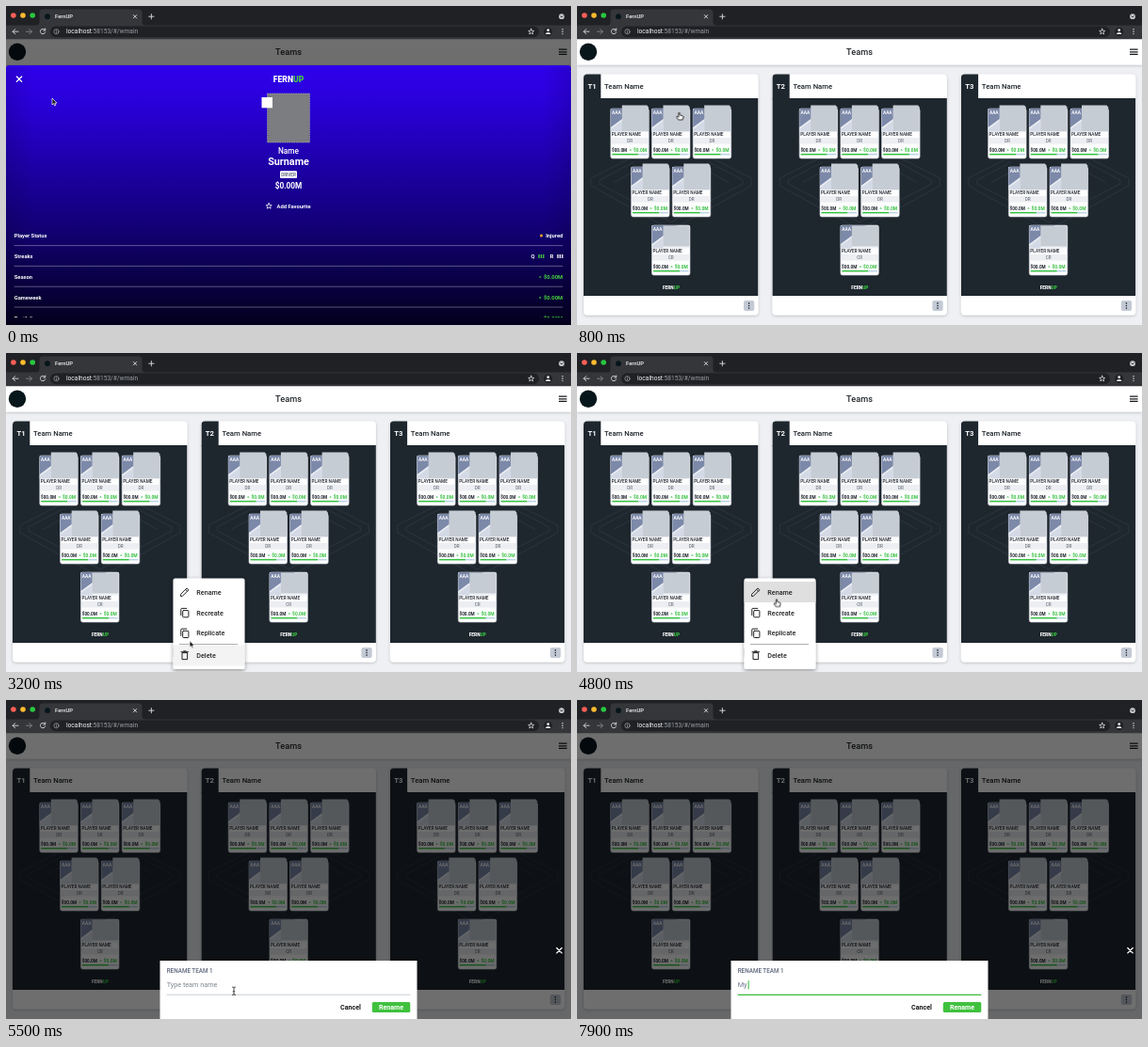
An HTML page that plays this animation: 600x339 px, repeating every 8000 ms.

```html
<!DOCTYPE html>
<html lang="en">
<head>
<meta charset="utf-8">
<title>Teams</title>
<style>
html, body { margin: 0; width: 100%; height: 100%; overflow: hidden; background: #eef0f3; }
svg { display: block; width: 100%; height: 100%; }
text { font-family: Roboto, "Liberation Sans", sans-serif; }
.m { font-weight: 500; }
.b { font-weight: 700; }
.k { font-weight: 900; }
.c { text-anchor: middle; }
.e { text-anchor: end; }
.line { fill: none; stroke-linecap: round; stroke-linejoin: round; }

#sheet, #dim, #menu, #menu-box, .hover, #dialog, #dialog-x, .pointer, #pointer,
#focus, #hint, #m, #y, #caret, #caret-x {
  animation: 8s linear infinite;
}
#sheet { animation-name: sheet; }
#dim { animation-name: dim; }
#menu { animation-name: menu; }
#menu-box { animation-name: grow; }
#h-delete { animation-name: h-delete; }
#h-replicate { animation-name: h-replicate; }
#h-recreate { animation-name: h-recreate; }
#h-rename { animation-name: h-rename; }
#dialog { animation-name: dialog; }
#dialog-x { animation-name: dialog-x; }
#focus { animation-name: focus; }
#hint { animation-name: hint; animation-timing-function: step-end; }
#m { animation-name: key-m; animation-timing-function: step-end; }
#y { animation-name: key-y; animation-timing-function: step-end; }
#caret-x { animation-name: caret-x; animation-timing-function: step-end; }
#caret { animation-name: caret; }
#pointer { animation-name: travel; animation-timing-function: ease-in-out; }
.pointer { animation-timing-function: step-end; }
#arrow { animation-name: arrow; }
#hand { animation-name: hand; }
#beam { animation-name: beam; }

@keyframes sheet {
  0%, 6.4% { transform: translateY(0); }
  7.45%, 7.8% { transform: translateY(10.8px); }
  8.75% { transform: translateY(125px); }
  9.85%, 100% { transform: translateY(285px); }
}
@keyframes dim {
  0%, 6.4% { opacity: 1; }
  7.5% { opacity: .96; }
  8.75% { opacity: .5; }
  9.85%, 62.5% { opacity: 0; }
  65.6%, 100% { opacity: 1; }
}
@keyframes menu {
  0%, 31.3% { opacity: 0; }
  33.5%, 60.8% { opacity: 1; }
  62.6%, 100% { opacity: 0; }
}
@keyframes grow {
  0%, 31.3% { clip-path: inset(0 60% 90% 0); }
  35%, 100% { clip-path: inset(-5px -5px -5px -5px); }
}
@keyframes h-delete {
  0%, 33% { opacity: 0; }
  34%, 39.6% { opacity: .5; }
  41%, 100% { opacity: 0; }
}
@keyframes h-replicate {
  0%, 40.2% { opacity: 0; }
  40.8%, 41.3% { opacity: .4; }
  42%, 100% { opacity: 0; }
}
@keyframes h-recreate {
  0%, 41.3% { opacity: 0; }
  41.8%, 42.3% { opacity: .4; }
  43.2%, 100% { opacity: 0; }
}
@keyframes h-rename {
  0%, 42.3% { opacity: 0; }
  43%, 58.7% { opacity: .5; }
  60%, 100% { opacity: 1; }
}
@keyframes dialog {
  0%, 62.5% { transform: translateY(64px); animation-timing-function: ease-out; }
  66%, 100% { transform: translateY(0); }
}
@keyframes dialog-x {
  0%, 62.5% { opacity: 0; }
  66%, 100% { opacity: 1; }
}
@keyframes focus {
  0%, 73.2% { opacity: 0; }
  76.2%, 100% { opacity: 1; }
}
@keyframes hint { 0% { opacity: 1; } 83.7%, 100% { opacity: 0; } }
@keyframes key-m { 0% { opacity: 0; } 83.7%, 100% { opacity: 1; } }
@keyframes key-y { 0% { opacity: 0; } 87.5%, 100% { opacity: 1; } }
@keyframes caret-x {
  0% { transform: translateX(-10.6px); }
  83.7% { transform: translateX(-3.6px); }
  87.5%, 100% { transform: translateX(0); }
}
@keyframes caret {
  0%, 73.2% { opacity: 0; }
  74.5%, 94.2% { opacity: 1; }
  96%, 97.6% { opacity: 0; }
  98.7%, 100% { opacity: 1; }
}
@keyframes travel {
  0% { transform: translate(49px, 98px); }
  5%, 7.6% { transform: translate(13.5px, 77px); }
  9.9%, 10.2% { transform: translate(108.5px, 113px); animation-timing-function: linear; }
  11.25% { transform: translate(138px, 186px); animation-timing-function: ease-out; }
  15%, 19% { transform: translate(168px, 284px); }
  26%, 34% { transform: translate(182px, 317px); }
  40% { transform: translate(195px, 306px); animation-timing-function: ease-out; }
  43.75% { transform: translate(212px, 263px); }
  45%, 61.5% { transform: translate(212px, 261.5px); }
  68.5%, 100% { transform: translate(242px, 309px); }
}
@keyframes arrow {
  0% { opacity: 1; }
  4.9% { opacity: 0; }
  7.4% { opacity: 1; }
  8.9% { opacity: 0; }
  12% { opacity: 1; }
  24.5% { opacity: 0; }
  39% { opacity: 1; }
  40.5% { opacity: 0; }
  62.5% { opacity: 1; }
  66%, 100% { opacity: 0; }
}
@keyframes hand {
  0% { opacity: 0; }
  4.9% { opacity: 1; }
  7.4% { opacity: 0; }
  8.9% { opacity: 1; }
  12% { opacity: 0; }
  24.5% { opacity: 1; }
  39% { opacity: 0; }
  40.5% { opacity: 1; }
  62.5%, 100% { opacity: 0; }
}
@keyframes beam {
  0% { opacity: 0; }
  66% { opacity: 1; }
  71.2%, 100% { opacity: 0; }
}
</style>
</head>
<body>
<svg viewBox="0 0 600 339" preserveAspectRatio="none">
  <defs>
    <linearGradient id="blue" x1="0" y1="0" x2="0" y2="1">
      <stop offset="0" stop-color="#2f00ec"/>
      <stop offset=".15" stop-color="#2900d8"/>
      <stop offset=".6" stop-color="#13007a"/>
      <stop offset="1" stop-color="#03001c"/>
    </linearGradient>
    <linearGradient id="sides">
      <stop offset="0" stop-opacity=".12"/>
      <stop offset=".05" stop-opacity="0"/>
      <stop offset=".95" stop-opacity="0"/>
      <stop offset="1" stop-opacity=".12"/>
    </linearGradient>
    <filter id="soft" x="-10%" y="-10%" width="120%" height="125%">
      <feDropShadow dx="0" dy="1" stdDeviation="1.5" flood-opacity=".22"/>
    </filter>
    <filter id="deep" x="-15%" y="-15%" width="130%" height="130%">
      <feDropShadow dx="0" dy="1.5" stdDeviation="2" flood-opacity=".4"/>
    </filter>
    <clipPath id="view"><rect y="63" width="600" height="268"/></clipPath>
    <clipPath id="page"><rect y="35" width="600" height="304"/></clipPath>
    <clipPath id="team-clip"><rect x="7" y="72.5" width="185.5" height="256" rx="4"/></clipPath>

    <path id="star" class="line" d="M0-3 .9-.9 3-.8 1.4 .6 1.9 2.7 0 1.5-1.9 2.7-1.4 .6-3-.8-.9-.9z"/>
    <path id="cross" class="line" d="M-2.7-2.7 2.7 2.7M2.7-2.7-2.7 2.7"/>
    <g id="copy" class="line" stroke="#222">
      <rect x="-2.3" y="-2.2" width="6.2" height="7.2" rx=".7"/>
      <path d="M-4.2 2.8V-3.6Q-4.2-4.4-3.4-4.4H1.8"/>
    </g>
    <path id="bars" d="M0-2v4M2.4-2v4M4.8-2v4" stroke-width="1.3"/>

    <g id="player">
      <rect width="40.5" height="53" rx="2" fill="#fdfdfe" stroke="#d3d8e0" stroke-width=".6"/>
      <path d="M0 24.5V0H40V24.5z" fill="#eceff4"/>
      <path d="M0 2Q0 0 2 0H27L0 20z" fill="#7c89a9"/>
      <path d="M0 24.5V22L12 13V24.5z" fill="#d4dae5"/>
      <text class="b" x="1.3" y="6.2" font-size="4.8" fill="#fff">AAA</text>
      <text class="m" x="1" y="29" font-size="4.7" fill="#20262e">PLAYER NAME</text>
      <rect x=".5" y="31" width="39.5" height="6.5" fill="#eceef2"/>
      <text class="b" x="1.2" y="45.6" font-size="4.7" fill="#1c2229">$00.0M</text>
      <g fill="#35c13f">
        <path d="M19.7 44.6 21 43.1 22.3 44.6z"/>
        <text class="b" x="24.2" y="45.6" font-size="4.9">$0.0M</text>
        <rect x="1.5" y="47.9" width="28" height="1.5"/>
      </g>
      <rect x="29.5" y="47.9" width="9.5" height="1.5" fill="#b9d3e6"/>
    </g>
    <g id="driver">
      <use href="#player"/>
      <path d="M12-3.6H38.5L40.2-1.5V24.3H12z" fill="#c6ccd4"/>
      <text class="c" x="20.3" y="36" font-size="4.6" fill="#565d68">DR</text>
    </g>
    <g id="crew">
      <use href="#player"/>
      <rect x="12" y=".4" width="28" height="22" fill="#c6ccd4"/>
      <text class="c" x="20.3" y="36" font-size="4.6" fill="#565d68">CR</text>
    </g>

    <g id="team">
      <rect x="7" y="72.5" width="185.5" height="256" rx="4" fill="#fff" filter="url(#soft)"/>
      <g clip-path="url(#team-clip)" fill="#1e262e">
        <rect x="7" y="72" width="18.3" height="27"/>
        <rect x="7" y="98" width="185.5" height="210"/>
      </g>
      <path class="line" stroke="#29323b" stroke-width="1.2" d="M60 160 15 183V191L60 216L100 238 140 216 185 191V183L140 160M60 166 24 185V189L62 209 100 230 138 209 176 189V185L140 166M40 187 75 168M160 187 125 168"/>
      <text class="m" x="29" y="88.2" font-size="7.7" fill="#1d2228">Team Name</text>
      <use href="#driver" x="35.8" y="109"/>
      <use href="#driver" x="79.5" y="109"/>
      <use href="#driver" x="123.2" y="109"/>
      <use href="#driver" x="57.6" y="171"/>
      <use href="#driver" x="101.3" y="171"/>
      <use href="#crew" x="79.5" y="233"/>
      <text class="k c" x="100" y="301.3" font-size="4.8" fill="#fff">FERN<tspan fill="#35c13f">UP</tspan></text>
      <rect x="177" y="313" width="11.3" height="11" rx="2" fill="#c3cad5"/>
      <g fill="#20262e"><circle cx="182.6" cy="315.9" r=".8"/><circle cx="182.6" cy="318.5" r=".8"/><circle cx="182.6" cy="321.1" r=".8"/></g>
    </g>
  </defs>

  <!-- page -->
  <rect y="35" width="600" height="304" fill="#eef0f3"/>
  <rect y="35" width="600" height="27.5" fill="#fff" filter="url(#soft)"/>
  <circle cx="12" cy="48.7" r="9.2" fill="#06161b"/>
  <text class="m c" x="300" y="52.3" font-size="9.2" fill="#23272c">Teams</text>
  <path d="M587 46.2h8.6M587 48.8h8.6M587 51.4h8.6" stroke="#16191c" stroke-width="1.2"/>
  <use href="#team"/>
  <use href="#team" x="200.4"/>
  <use href="#team" x="400.8"/>
  <g class="b c" font-size="7.7" fill="#fff">
    <text x="16" y="88.2">T1</text>
    <text x="216.4" y="88.2">T2</text>
    <text x="416.8" y="88.2">T3</text>
  </g>

  <!-- popup menu -->
  <g id="menu"><g id="menu-box">
    <rect x="177.5" y="239.5" width="76" height="96.5" rx="2" fill="#fff" filter="url(#deep)"/>
    <g fill="#dfdfdf">
      <rect class="hover" id="h-rename" x="177.5" y="243" width="76" height="22"/>
      <rect class="hover" id="h-recreate" x="177.5" y="265" width="76" height="22"/>
      <rect class="hover" id="h-replicate" x="177.5" y="287" width="76" height="22"/>
      <rect class="hover" id="h-delete" x="177.5" y="310.5" width="76" height="22"/>
    </g>
    <path d="M184 309.5H246" stroke="#a6a6a6" stroke-width=".9"/>
    <g class="line" stroke="#222">
      <path d="M185.6 258.2V256.3L192 249.9 193.9 251.8 187.5 258.2zM190.6 251.3 192.5 253.2"/>
      <path d="M187 319V325.6H192.6V319zM186 317.7H193.6M188.6 316.8H191"/>
    </g>
    <use href="#copy" x="190" y="275.8"/>
    <use href="#copy" x="190" y="297.5"/>
    <g class="m" font-size="7.2" fill="#262626">
      <text x="202.3" y="256.6">Rename</text>
      <text x="202.3" y="278.6">Recreate</text>
      <text x="202.3" y="300.2">Replicate</text>
      <text x="202.3" y="324.2">Delete</text>
    </g>
  </g></g>

  <rect id="dim" y="35" width="600" height="304" fill="#000" fill-opacity=".57"/>

  <!-- player sheet -->
  <g clip-path="url(#page)"><g id="sheet">
    <path id="panel" d="M0 340V67Q0 63 4 63H596Q600 63 600 67V340z" fill="url(#blue)"/>
    <use href="#panel"/>
    <rect y="65" width="600" height="275" fill="url(#sides)"/>
    <g clip-path="url(#view)" fill="#fff">
      <use href="#cross" x="14" y="77.7" stroke="#fff" stroke-width="1.3"/>
      <text class="k c" x="300" y="80.9" font-size="8.6">FERN<tspan fill="#45d13f">UP</tspan></text>
      <rect x="277.5" y="93" width="45" height="52" fill="#7b7d80" stroke="#a5a6aa" stroke-width=".7" stroke-dasharray="1.5 1"/>
      <rect x="271.5" y="97" width="11.5" height="11.3"/>
      <text class="m c" x="300" y="157" font-size="8.3">Name</text>
      <text class="b c" x="300" y="168.9" font-size="10.8">Surname</text>
      <rect x="291" y="175.3" width="18" height="7.6" rx="1"/>
      <text class="m c" x="300" y="180.8" font-size="4.6" fill="#4d5670">DRIVER</text>
      <text class="b c" x="300" y="194" font-size="8.3">$0.00M</text>
      <use href="#star" x="279.2" y="212.5" stroke="#fff" stroke-width=".8" fill="none"/>
      <g class="b" font-size="5.8">
        <text x="287.5" y="214.6">Add Favourite</text>
        <text x="8.7" y="246.1">Player Status</text>
        <text x="8.7" y="268">Streaks</text>
        <text x="8.7" y="289.9">Season</text>
        <text x="8.7" y="311.7">Gameweek</text>
        <text x="8.7" y="333.5">Portfolio</text>
        <text class="e" x="591.3" y="246.1">Injured</text>
        <text x="557.5" y="268">Q</text>
        <text x="577.8" y="268">R</text>
      </g>
      <circle cx="568.5" cy="244" r="1.5" fill="#f5a623"/>
      <use href="#bars" x="566" y="266" stroke="#45d13f"/>
      <use href="#bars" x="586" y="266" stroke="#fff"/>
      <g class="b e" font-size="5.9" fill="#45d13f">
        <path d="M565.8 288.6 567.2 287 568.6 288.6zM565.8 310.4 567.2 308.8 568.6 310.4zM565.8 332.2 567.2 330.6 568.6 332.2z"/>
        <text x="591.3" y="289.9">$0.00M</text>
        <text x="591.3" y="311.7">$0.00M</text>
        <text x="591.3" y="333.5">$0.00M</text>
      </g>
      <path d="M8.7 254.6H591.3M8.7 276.4H591.3M8.7 298.2H591.3M8.7 320H591.3" stroke="#fff" stroke-opacity=".42" stroke-width=".8"/>
    </g>
  </g></g>

  <!-- rename dialog -->
  <g id="dialog-x"><use href="#cross" x="587.5" y="266.2" stroke="#fff" stroke-width="1.3"/></g>
  <g id="dialog">
    <rect x="163.5" y="277" width="273" height="63" fill="#fff"/>
    <text class="m" x="170.7" y="290.3" font-size="6.3" fill="#5a6579">RENAME TEAM 1</text>
    <text id="hint" x="170.7" y="305.1" font-size="7.25" fill="#7d8490">Type team name</text>
    <g font-size="7.25" fill="#69738a">
      <text id="m" x="170.7" y="305.1">M</text>
      <text id="y" x="177.1" y="305.1">y</text>
    </g>
    <path d="M170.7 313.2H429.3" stroke="#b9bfca" stroke-width=".8"/>
    <path id="focus" d="M170.7 313.4H429.3" stroke="#42bf40" stroke-width="1.3"/>
    <g id="caret-x"><rect id="caret" x="181.6" y="298.2" width="1.1" height="9.2" fill="#42bf40"/></g>
    <text class="b c" x="366" y="329" font-size="7.1" fill="#14171a">Cancel</text>
    <rect x="388.8" y="321" width="40.5" height="11" rx="1.5" fill="#40c13e"/>
    <text class="b c" x="409" y="329" font-size="7.1" fill="#fff">Rename</text>
  </g>

  <!-- browser frame -->
  <rect width="600" height="21" fill="#202124"/>
  <path d="M32 20.5Q35.5 20.5 35.5 17V7Q35.5 3.5 39 3.5H141Q144.5 3.5 144.5 7V17Q144.5 20.5 148 20.5H600V35.2H0V20.5z" fill="#35363a"/>
  <circle cx="7.9" cy="10" r="2.8" fill="#ff5f57"/>
  <circle cx="18" cy="10" r="2.8" fill="#febc2e"/>
  <circle cx="28.2" cy="10" r="2.8" fill="#28c840"/>
  <circle cx="44" cy="11.2" r="2.9" fill="#06161b"/>
  <text class="m" x="52" y="13.2" font-size="5.8" fill="#f1f3f4">FernUP</text>
  <rect x="47" y="21.5" width="519" height="11.8" rx="5.9" fill="#202124"/>
  <g class="line" stroke="#dcdee2" stroke-width=".9">
    <path d="M135.3 9.5 138.7 12.9M138.7 9.5 135.3 12.9M151.7 11.2H157M154.35 8.6V13.8"/>
    <path d="M13 27.2H7.2M9.7 24.6 7.1 27.2 9.7 29.8"/>
    <path d="M21.5 27.2H27.3M24.8 24.6 27.4 27.2 24.8 29.8" stroke="#85878b"/>
    <path d="M41.3 25.4A2.7 2.7 0 1 0 41.7 27.9M41.7 24V26H39.7"/>
    <g stroke="#a6a9ae" stroke-width=".7">
      <circle cx="53.5" cy="27.2" r="2.6"/>
      <path d="M53.5 27V28.5M53.5 25.8V25.9"/>
    </g>
    <use href="#star" x="557.7" y="27.2" stroke-width=".8"/>
  </g>
  <text x="64" y="29.4" font-size="6.6" fill="#f1f3f4">localhost<tspan fill="#9aa0a6">:58153/#/wmain</tspan></text>
  <circle cx="590" cy="11.2" r="2.9" fill="#c4c7cb"/>
  <path class="line" d="M588.7 10.7 590 12 591.3 10.7" stroke="#202124" stroke-width=".8"/>
  <circle cx="575.7" cy="27.2" r="4.5" fill="#202124"/>
  <g fill="#e8eaed">
    <circle cx="575.7" cy="25.7" r="1.4"/>
    <path d="M572.9 29.9Q573.2 27.9 575.7 27.9T578.5 29.9z"/>
    <circle cx="591" cy="24.8" r=".7"/><circle cx="591" cy="27.2" r=".7"/><circle cx="591" cy="29.6" r=".7"/>
  </g>

  <!-- mouse pointer -->
  <g id="pointer">
    <path id="arrow" class="pointer" d="M0 0V7L1.6 5.6 2.7 8 3.9 7.5 2.8 5.1H5z" fill="#111" stroke="#fff" stroke-width=".7"/>
    <path id="hand" class="pointer" d="M-.7 .6Q0-.4 .7 .6V3L3.5 3.6Q4.3 3.9 4.2 4.8L3.5 8H-.8L-2.9 5.2Q-3 4.1-1.9 4.4L-.7 5.3z" fill="#fff" stroke="#111" stroke-width=".8" stroke-linejoin="round"/>
    <path id="beam" class="pointer line" d="M-1.5-4Q0-4 0-3Q0-4 1.5-4M0-3V3.5M-1.5 4.5Q0 4.5 0 3.5Q0 4.5 1.5 4.5M-.8 .8H.8" stroke="#222" stroke-width=".8"/>
  </g>
</svg>
</body>
</html>
```
